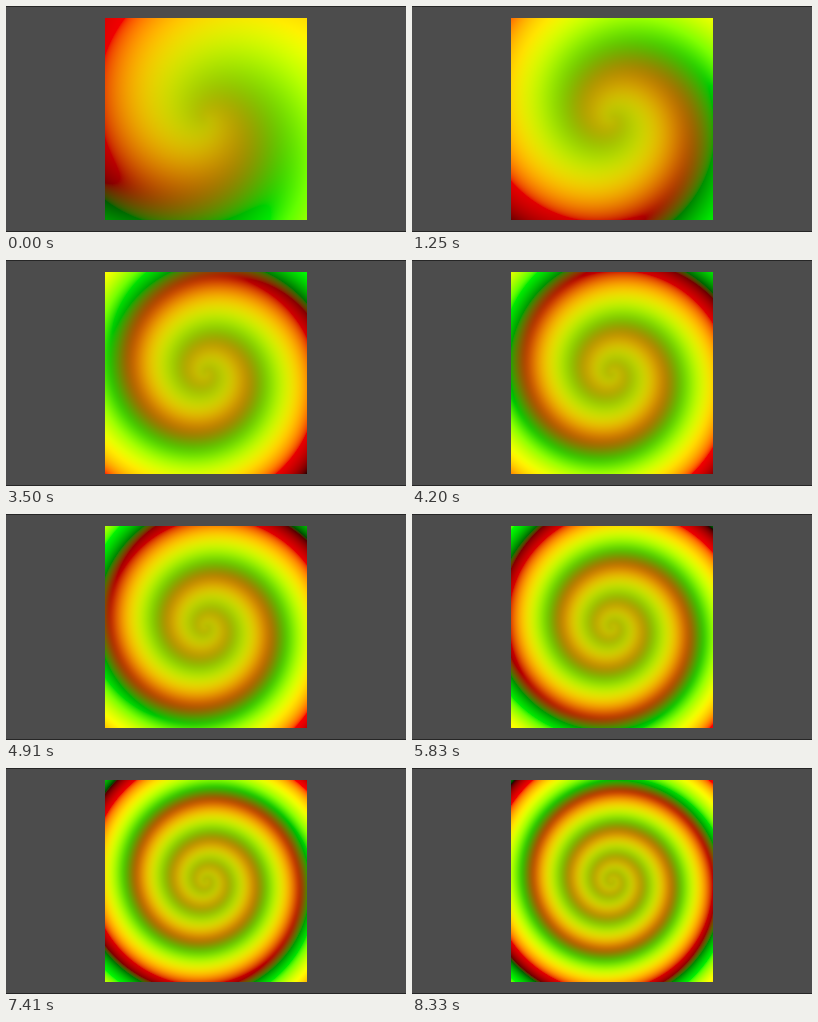
Recreate the animation shown at these times as an HTML page with a canvas. Size 400 by 226 pixels, loop 8.43 s.

```html
<!DOCTYPE html>
<html lang="en">
<head>
<meta charset="utf-8">
<title>Twirl</title>
<style>
  html, body { margin: 0; width: 100%; height: 100%; overflow: hidden; background: #4c4c4c; }
  canvas { display: block; width: 400px; height: 226px; }
</style>
</head>
<body>
<canvas id="stage" width="400" height="226"></canvas>
<script>
const LOOP = 8430, LAST = 200, FPS = 24;
const SIZE = 202, LEFT = 99, TOP = 12;
const START = 6.8, SPEED = 3.7; // twist in radians, radians per second

const ctx = document.getElementById('stage').getContext('2d');
const img = ctx.createImageData(SIZE, SIZE);

// Linear light to sRGB, as a lookup
const gamma = new Uint8ClampedArray(1025);
for (let i = 0; i <= 1024; i++) {
  const v = i / 1024;
  gamma[i] = 255 * (v < 0.0031308 ? 12.92 * v : 1.055 * Math.pow(v, 1 / 2.4) - 0.055);
}
const tone = v => gamma[Math.round(Math.min(1, Math.max(0, v)) * 1024)];

// Polar coordinates of each pixel, measured from the middle;
// pull is how strongly the twist turns that pixel
const radius = new Float32Array(SIZE * SIZE);
const angle = new Float32Array(SIZE * SIZE);
const pull = new Float32Array(SIZE * SIZE);
for (let y = 0, i = 0; y < SIZE; y++) {
  for (let x = 0; x < SIZE; x++, i++) {
    const dx = (x + 0.5) / SIZE - 0.5, dy = 0.5 - (y + 0.5) / SIZE;
    radius[i] = Math.hypot(dx, dy);
    angle[i] = Math.atan2(dy, dx) + Math.PI / 2;
    pull[i] = 1 - Math.sqrt(radius[i]);
  }
}

function drawFrame() {
  ctx.fillStyle = '#4c4c4c';
  ctx.fillRect(0, 0, 400, 226);
  ctx.fillStyle = '#262626';
  ctx.fillRect(0, 0, 400, 1);
  ctx.fillRect(0, 225, 400, 1);
}

function drawTwirl(sec) {
  const twist = START + SPEED * sec, px = img.data;
  for (let i = 0, p = 0; i < radius.length; i++, p += 4) {
    const r = radius[i], a = angle[i] - twist * pull[i];
    px[p] = tone(0.5 + r * Math.sin(a));
    px[p + 1] = tone(0.5 + r * Math.cos(a));
    px[p + 2] = 0;
    px[p + 3] = 255;
  }
  ctx.putImageData(img, LEFT, TOP);
}

let shown = -1;
const origin = performance.now();
function tick() {
  const ms = (performance.now() - origin) % LOOP;
  const step = Math.min(LAST, Math.floor((ms + 2) * FPS / 1000));
  if (step !== shown) {
    shown = step;
    drawTwirl(step / FPS);
  }
  requestAnimationFrame(tick);
}
drawFrame();
tick();
</script>
</body>
</html>
```
